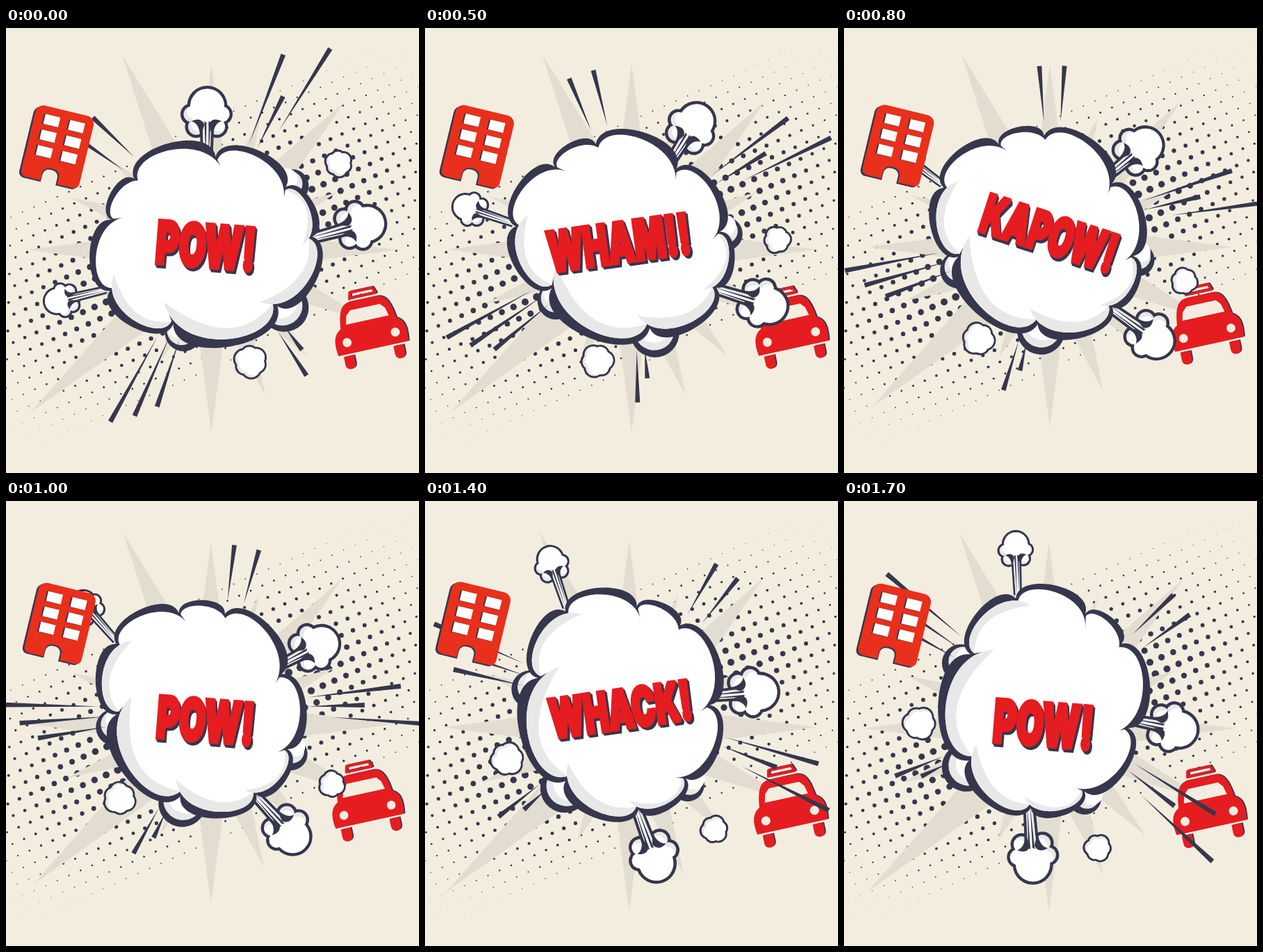
Write an HTML page with a canvas that moves like this. It is 594 by 640 pixels and loops after 1.8 s.

```html
<!DOCTYPE html>
<html lang="en">
<head>
<meta charset="utf-8">
<title>Comic burst</title>
<style>
  html, body { margin: 0; width: 100%; height: 100%; overflow: hidden; background: #f3ede0; }
  canvas { display: block; }
</style>
</head>
<body>
<canvas id="stage" width="594" height="640"></canvas>
<script>
const ctx = document.getElementById('stage').getContext('2d');
const CREAM = '#f3ede0', RAY = '#e3ddd1', INK = '#36374c', RED = '#e51d21',
      BRICK = '#e8301c', WHITE = '#fff', GREY = '#e8e8e9';
const STEP = 100, STEPS = 18, RAD = Math.PI / 180;
const CENTER = [295, 319], PIVOT = [299.5, 296];

// Camera: step, scale, vertical shift
const CAMERA = [[0, 1, 0], [5, 1, -.5], [8, .985, -4], [11, .978, 5.5], [14, 1.008, 6.5], [17, 1.003, 8]];

// text, centre x, centre y, angle, size
const POW = ['POW!', 287, 313, 4.5, 84];
const WORDS = [POW, ['WHAM!!', 276.5, 309, -7.8, 79], ['KAPOW!', 294.5, 299, 18, 77],
               POW, ['WHACK!', 282.5, 293, -8, 76], POW];

const RAY_LENGTHS = [267, 254, 206, 224, 263, 177, 351, 225, 265, 217, 188, 309, 267, 201, 287, 198];

// first angle, angle step, inner radius, outer radii
const STREAKS = [[-69, 5.5, 138, 276, 221, 314], [215, 8.7, 160, 242, 242],
                 [119, -5.3, 160, 309, 286, 262], [57, -4, 168, 243, 209]];

// Points where neighbouring lobes of the cloud meet, clockwise
const VALLEYS = [[184, 217], [301, 185], [402, 229], [440, 300], [390, 400], [240, 426], [149, 378], [152, 276]];

function placed(x, y, degrees, scale, draw) {
  ctx.save();
  ctx.translate(x, y);
  ctx.rotate(degrees * RAD);
  ctx.scale(scale, scale);
  draw();
  ctx.restore();
}

function fillPath(color, build) {
  ctx.fillStyle = color;
  ctx.beginPath();
  build();
  ctx.fill();
}

function polygon(color, ...points) {
  fillPath(color, () => points.forEach(([x, y]) => ctx.lineTo(x, y)));
}

function circle(color, x, y, r) {
  fillPath(color, () => ctx.arc(x, y, r, 0, 7));
}

// Pointed wedge along the x axis
function spike(color, [x, y], degrees, base, tip, halfWidth) {
  placed(x, y, degrees, 1, () => polygon(color, [base, -halfWidth], [tip, 0], [base, halfWidth]));
}

function dots() {
  for (const side of [1, -1]) {
    for (let i = -14; i < 24; i++) for (let j = -18; j < 18; j++) {
      const x = 148 + i * 16.7 + j * 7.8, y = -81 - i * 7.3 + j * 16.8;
      const along = x * .916 - y * .4, across = Math.abs(x * .4 + y * .916);
      if (along < 0 || across > 166) continue;
      const size = Math.max(1, 5.9 - .0225 * Math.max(0, along - 150));
      circle(INK, 292 + side * x, 313 + side * y, size * (1 - .0052 * across));
    }
  }
}

function rays() {
  RAY_LENGTHS.forEach((length, i) => {
    const angle = i * 22.5;
    const lean = 3 * Math.abs(Math.sin(2 * angle * RAD)) * Math.sign(Math.sin(angle * RAD));
    spike(RAY, CENTER, angle + lean, 100, length, length * .082);
  });
}

function carShape(color) {
  fillPath(color, () => {
    ctx.moveTo(0, 0);
    ctx.bezierCurveTo(-3, -20, 0, -31, 11, -37);
    ctx.bezierCurveTo(14, -62, 19, -72, 32, -73);
    ctx.lineTo(72, -73);
    ctx.bezierCurveTo(85, -72, 90, -60, 93, -37);
    ctx.bezierCurveTo(104, -31, 106, -20, 103, 0);
    for (const x of [7, 80]) ctx.roundRect(x, 3, 15, 19, [0, 0, 7, 7]);
  });
  ctx.strokeStyle = color;
  ctx.lineWidth = 4;
  ctx.lineJoin = 'round';
  ctx.beginPath();
  for (const [x, y] of [[33, -78], [35, -86], [68, -86], [71, -78]]) ctx.lineTo(x, y);
  ctx.closePath();
  ctx.stroke();
}

function car() {
  placed(478, 472, -12.3, 1, () => {
    placed(1.8, -.4, 0, 1, () => carShape(INK));
    carShape(RED);
    polygon(CREAM, [20, -42], [23, -54], [30, -61], [74, -61], [80, -54], [83, -42]);
    for (const x of [16, 87]) circle(CREAM, x, -16.5, 6.5);
  });
}

function building() {
  const box = (color, x, y, w, h, r) => fillPath(color, () => ctx.roundRect(x, y, w, h, r));
  placed(74, 170.5, 13.6, 1, () => {
    box(INK, -45.5, -51, 86, 106, [12, 12, 8, 8]);
    box(BRICK, -43, -53, 86, 106, [12, 12, 8, 8]);
    for (const x of [-18, 18.5]) for (const y of [-34, -11, 12]) {
      box(INK, x - 12, y - 7.5, 23, 15, 0);
      box(WHITE, x - 10, y - 7.5, 22, 14.5, 0);
    }
    box(INK, -13, 33, 25, 21, [10, 10, 0, 0]);
    box(CREAM, -12, 35, 22, 22, [9, 9, 0, 0]);
  });
}

function balls(list, edge) {
  const layer = (color, inset, dx, dy) => fillPath(color, () => {
    for (const [x, y, r] of list) {
      ctx.moveTo(x + dx, y + dy);
      ctx.arc(x + dx, y + dy, r - inset, 0, 7);
    }
  });
  ctx.save();
  layer(INK, 0, 0, 0);
  layer(GREY, edge, 0, 0);
  ctx.clip();
  layer(WHITE, edge, edge, -edge);
  ctx.restore();
}

function puff(x, y, size) {
  const list = [];
  for (let i = 0; i < 6; i++) {
    const angle = i * 60 * RAD + .4;
    list.push([Math.cos(angle) * size * .43, Math.sin(angle) * size * .43, size * (.58 + i % 2 * .06)]);
  }
  placed(x, y, 0, 1, () => balls(list, 3));
}

function mushroom(x, y, degrees, scale, length) {
  const sides = [-1, 1];
  placed(x, y, degrees, scale, () => {
    const skirt = sides.flatMap(side => [[22 * side, 3, 15.5], [15 * side, 21, 16]]);
    balls([[1, -9, 29], ...skirt], 4.5);
    circle(WHITE, 1, -8, 24);
    polygon(INK, [-8, length], [-10, 15], [11, 15], [9, length]);
    polygon(WHITE, [-4, length], [-6, 13], [7, 13], [5, length]);
    polygon(GREY, [-4, length], [-6, 13], [-2, 13], [-1, length]);
    for (const side of sides) {
      polygon(INK, [1 + side * 2, length], [side * 3, 13], [side * 3 + 3, 15]);
      fillPath(INK, () => {
        ctx.moveTo(side * 9, 36);
        ctx.quadraticCurveTo(side * 10, 16, side * 22, 13);
        ctx.quadraticCurveTo(side * 8, 6, side * 3, 18);
      });
    }
  });
}

// Every lobe swells from its chord by the same proportion and ends in an inward tail
const lobes = VALLEYS.map((from, i) => {
  const to = VALLEYS[(i + 1) % VALLEYS.length];
  const dx = to[0] - from[0], dy = to[1] - from[1], length = Math.hypot(dx, dy);
  const at = ([x, y], along, out) => [x + dx * along + dy * out, y + dy * along - dx * out];
  const swell = .4 - 8.5 / length;
  const inner = [at(from, .04, -.03), at(from, .02, swell), at(to, 0, swell), at(to, .05, -.22)];
  const [a, b, c, d] = inner;
  const light = (dy * .5 - dx * .87) / length;
  const depth = (4 + 13 * Math.max(0, light)) / length;
  const top = at([0, 1].map(k => (a[k] + 3 * b[k] + 3 * c[k] + d[k]) / 8), 0, -depth);
  return {
    outer: [from, at(from, -.05, .4), at(to, .05, .4), to],
    inner,
    shaded: light > -.3,
    shadeControl: [0, 1].map(k => 2 * top[k] - (a[k] + d[k]) / 2),
  };
});

function traceLobe([from, ...curve]) {
  ctx.lineTo(...from);
  ctx.bezierCurveTo(...curve.flat());
}

function cloud() {
  for (const [x, y, r] of [[411, 227, 24], [400, 402, 35], [255, 438, 27]]) {
    circle(INK, x, y, r);
    circle(GREY, x - 3, y - 3, r - 6);
    circle(WHITE, x - 7, y - 10, r - 9);
  }
  puff(478, 195, 20);
  puff(351, 480, 24);
  mushroom(288, 121, 0, 1, 66);
  mushroom(510, 283, 75, 1, 78);
  mushroom(79, 392, -103.4, .7, 95);

  fillPath(INK, () => lobes.forEach(lobe => traceLobe(lobe.outer)));
  fillPath(WHITE, () => lobes.forEach(lobe => traceLobe(lobe.inner)));
  for (const { inner, shadeControl } of lobes.filter(lobe => lobe.shaded)) {
    fillPath(GREY, () => {
      traceLobe(inner);
      ctx.quadraticCurveTo(...shadeControl, ...inner[0]);
    });
  }
  for (const [angle, turn, tip, ...ends] of STREAKS) {
    ends.forEach((end, i) => spike(INK, PIVOT, angle + i * turn, end, Math.max(tip, end - 140), 3.5));
  }
}

function word([text, x, y, degrees, size]) {
  placed(x, y, degrees, 1, () => {
    ctx.scale(.6, 1);
    ctx.font = `900 ${size}px Inter, "Open Sans", sans-serif`;
    ctx.textAlign = 'center';
    ctx.lineJoin = 'miter';
    ctx.miterLimit = 2;
    ctx.lineWidth = 6;
    const base = size * .364;
    for (const [color, shift] of [[INK, 4], [INK, 2], [RED, 0]]) {
      ctx.fillStyle = ctx.strokeStyle = color;
      ctx.strokeText(text, shift * 1.25, base + shift);
      ctx.fillText(text, shift * 1.25, base + shift);
    }
  });
}

function cameraAt(step) {
  const next = Math.max(1, CAMERA.findIndex(key => key[0] >= step));
  const a = CAMERA[next - 1], b = CAMERA[next], k = (step - a[0]) / (b[0] - a[0]);
  return [1, 2].map(i => a[i] + (b[i] - a[i]) * k);
}

function render(time) {
  const step = Math.floor(time / STEP) % STEPS;
  const [scale, dy] = cameraAt(step);
  const dx = .4 + 1.8 * Math.sin(step / STEPS * 2 * Math.PI);
  const turn = 6.6 * step - .039 * step * step;

  ctx.setTransform(1, 0, 0, 1, 0, 0);
  ctx.fillStyle = CREAM;
  ctx.fillRect(0, 0, 594, 640);
  dots();
  placed(CENTER[0] + dx, CENTER[1] + dy, 0, scale, () => {
    ctx.translate(-CENTER[0], -CENTER[1]);
    rays();
    car();
    placed(...PIVOT, turn, 1, () => {
      ctx.translate(-PIVOT[0], -PIVOT[1]);
      cloud();
    });
    building();
    word(WORDS[Math.floor(step / 3)]);
  });
}

let start;
function tick(now) {
  start ??= now;
  render(now - start);
  requestAnimationFrame(tick);
}
render(0);
requestAnimationFrame(tick);
</script>
</body>
</html>
```
